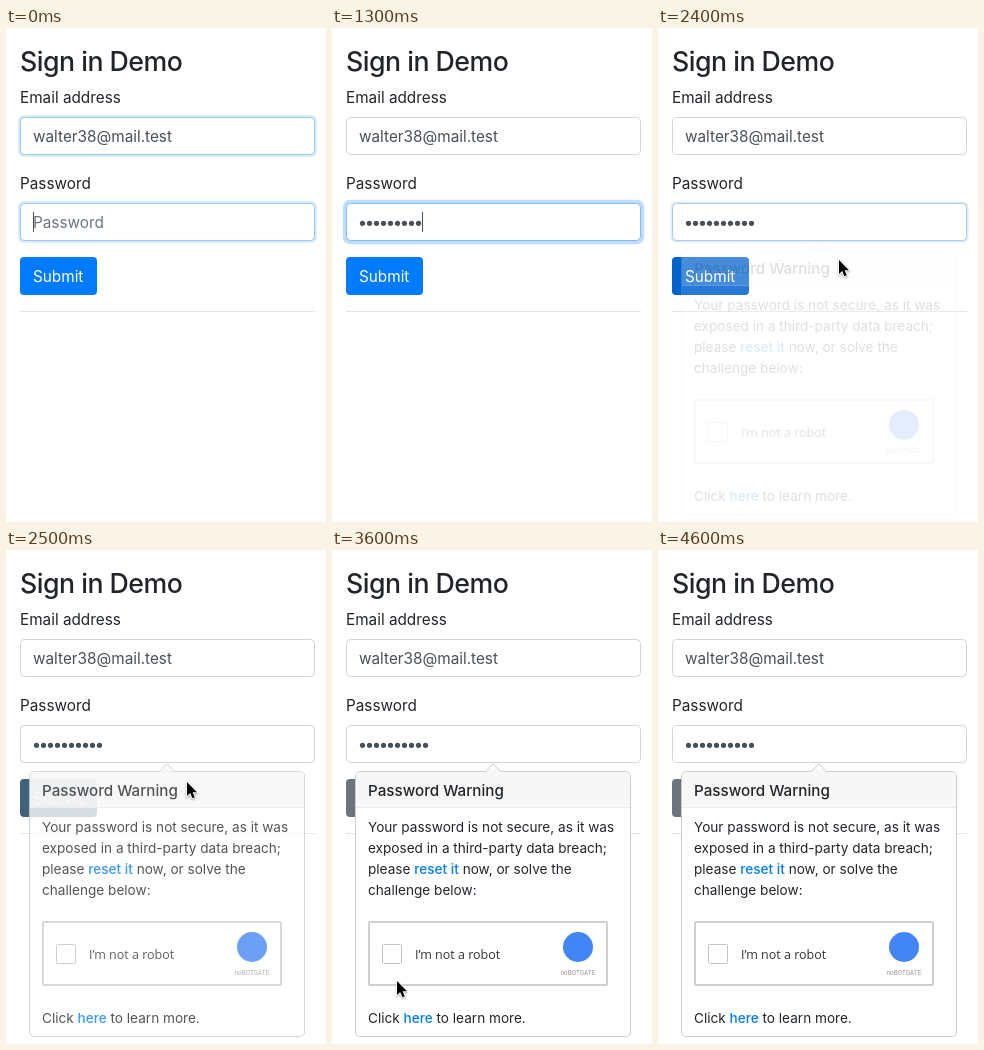
Recreate the animation shown at these times as an HTML page with a canvas. Size 320x494 px, loop 5 s.

```html
<!DOCTYPE html>
<html lang="en">
<head>
<meta charset="utf-8">
<title>Sign in Demo</title>
<style>
html, body { margin: 0; width: 100%; height: 100%; overflow: hidden; background: #fff; }
canvas { display: block; }
</style>
</head>
<body>
<canvas id="stage" width="320" height="494"></canvas>
<script>
const ctx = document.getElementById('stage').getContext('2d');
const LOOP = 5000, STEP = 100;
const SANS = 'Inter, "Liberation Sans", sans-serif';
const INK = '#212529', FIELD_INK = '#495057', BLUE = '#007bff';

// [start ms, number of typed characters]
const typing = [[0, 0], [300, 1], [400, 3], [500, 5], [700, 7], [1000, 8], [1300, 9], [1500, 10]];

// [ms, x, y] of the pointer; straight moves in between
const pointerPath = [
  [1900, 180, 151], [2200, 181, 231], [2500, 181, 232], [3000, 128, 327],
  [3400, 58, 406], [3500, 58, 406], [3600, 65, 431], [3800, 81, 457],
  [3900, 81, 457], [4100, 114, 318], [4200, 100, 357], [4300, 100, 357],
  [4400, 81, 458], [4500, 192, 440], [4600, 192, 440]
];

function typedAt(t) {
  return typing.filter(([start]) => start <= t).pop()[1];
}

function pointerAt(t) {
  const next = pointerPath.findIndex(([time]) => time > t);
  if (next < 1) return null;
  const [t0, x0, y0] = pointerPath[next - 1];
  const [t1, x1, y1] = pointerPath[next];
  const k = (t - t0) / (t1 - t0);
  return { x: Math.round(x0 + (x1 - x0) * k), y: Math.round(y0 + (y1 - y0) * k) };
}

function mix(from, to, k) {
  return `rgb(${from.map((c, i) => Math.round(c + (to[i] - c) * k)).join(',')})`;
}

function text(str, x, y, size, { color = INK, weight = 400, family = SANS, spacing = 0 } = {}) {
  ctx.font = `${weight} ${size}px ${family}`;
  ctx.letterSpacing = `${spacing}px`;
  ctx.fillStyle = color;
  ctx.fillText(str, x, y);
  return x + ctx.measureText(str).width;
}

function box(x, y, w, h, r, fill, stroke, lineWidth = 1) {
  const inset = stroke ? lineWidth / 2 : 0;
  ctx.beginPath();
  ctx.roundRect(x + inset, y + inset, w - 2 * inset, h - 2 * inset, r);
  if (fill) {
    ctx.fillStyle = fill;
    ctx.fill();
  }
  if (stroke) {
    ctx.lineWidth = lineWidth;
    ctx.strokeStyle = stroke;
    ctx.stroke();
  }
}

function field(y, focus) {
  const spread = 3.2 * focus;
  if (focus) {
    box(14 - spread, y - spread, 295 + 2 * spread, 38 + 2 * spread, 4 + spread, `rgba(0,123,255,${0.25 * focus})`);
  }
  box(14, y, 295, 38, 4, '#fff', mix([206, 212, 218], [128, 189, 255], focus));
}

function form(t) {
  text('Sign in Demo', 14, 43, 26.7, { weight: 500, spacing: -0.5 });

  text('Email address', 14, 75, 15.3);
  field(89, t < 100 ? 0.6 : 0);
  text('walter38@mail.test', 27, 114, 15.3, { color: FIELD_INK });

  text('Password', 14, 161, 15.3);
  field(175, t < 100 ? 0.6 : t < 2400 ? 1 : t < 2500 ? 0.5 : 0);
  const typed = typedAt(t);
  if (!typed) text('Password', 27, 200, 15.3, { color: '#6c757d' });
  ctx.fillStyle = FIELD_INK;
  for (let i = 0; i < typed; i++) {
    ctx.beginPath();
    ctx.arc(30.5 + 7 * i, 195.3, 2.6, 0, 2 * Math.PI);
    ctx.fill();
  }
  if (t < 1700 || (t >= 2200 && t < 2400)) ctx.fillRect(27 + 7 * typed, 184, 1, 20);

  const buttonColor = t < 2400 ? BLUE : t < 2500 ? '#0062cc' : t < 2600 ? '#41627a' : '#6c757d';
  box(14, 229, 77, 38, 4, buttonColor);
  text('Submit', 27, 254, 15.3, { color: '#fff' });
  ctx.fillStyle = 'rgba(0,0,0,.1)';
  ctx.fillRect(14, 283, 295, 1);
}

function robotCheck() {
  box(36, 371, 240, 65, 1, '#fff', '#cfcfcf', 2);
  box(50, 394, 20, 20, 1, '#fff', '#c4c4c4');
  text('I’m not a robot', 83, 409, 12.5, { color: '#333', family: '"Open Sans", sans-serif' });
  ctx.fillStyle = '#4285f4';
  ctx.beginPath();
  ctx.arc(246, 397, 15, 0, 2 * Math.PI);
  ctx.fill();
  text('noBOTGATE', 228.5, 425, 6.4, { color: '#999', family: 'Roboto, sans-serif' });
}

function popover() {
  const edge = '#cccccc', body = 13.6;
  const link = { color: BLUE, weight: 500 };
  box(23, 221, 276, 266, 4.8, '#fff', edge);
  ctx.fillStyle = '#f7f7f7';
  ctx.beginPath();
  ctx.roundRect(24, 222, 274, 36, [4, 4, 0, 0]);
  ctx.fill();
  ctx.fillStyle = '#ebebeb';
  ctx.fillRect(24, 257, 274, 1);

  ctx.beginPath();
  ctx.moveTo(153, 222);
  ctx.lineTo(161, 213.5);
  ctx.lineTo(169, 222);
  ctx.fillStyle = '#f7f7f7';
  ctx.fill();
  ctx.lineWidth = 1;
  ctx.strokeStyle = edge;
  ctx.stroke();

  text('Password Warning', 36, 246, 15.2, { weight: 500 });
  text('Your password is not secure, as it was', 36, 282, body);
  text('exposed in a third-party data breach;', 36, 303, body);
  let x = text('please ', 36, 324, body);
  x = text('reset it', x, 324, body, link);
  text(' now, or solve the', x, 324, body);
  text('challenge below:', 36, 345, body);
  robotCheck();
  x = text('Click ', 36, 473, body);
  x = text('here', x, 473, body, link);
  text(' to learn more.', x, 473, body);
}

function arrow(x, y) {
  const shape = new Path2D('M0 0V14L3.2 11L5.4 16.2L7.8 15.2L5.6 10.2H10Z');
  ctx.save();
  ctx.translate(x, y);
  ctx.shadowColor = 'rgba(0,0,0,.35)';
  ctx.shadowBlur = 2;
  ctx.shadowOffsetY = 1;
  ctx.lineWidth = 2;
  ctx.lineJoin = 'round';
  ctx.strokeStyle = '#fff';
  ctx.stroke(shape);
  ctx.shadowColor = 'transparent';
  ctx.fillStyle = '#000';
  ctx.fill(shape);
  ctx.restore();
}

function textCursor(x, y) {
  const shape = new Path2D('M-3 -7Q0 -7 .5 -5Q1 -7 4 -7M.5 -5V5M-3 7Q0 7 .5 5Q1 7 4 7M-1.5 2H2.5');
  ctx.lineWidth = 3;
  ctx.strokeStyle = 'rgba(255,255,255,.8)';
  ctx.stroke(shapeAt(shape, x, y));
  ctx.lineWidth = 1;
  ctx.strokeStyle = '#222';
  ctx.stroke(shapeAt(shape, x, y));
}

function shapeAt(shape, x, y) {
  const moved = new Path2D();
  moved.addPath(shape, new DOMMatrix().translate(x, y));
  return moved;
}

function pointer(t) {
  const at = pointerAt(t);
  if (!at) return;
  const overField = t < 2400 && at.y >= 175 && at.y < 213;
  const overText = t >= 2800 && t < 3200;
  (overField || overText ? textCursor : arrow)(at.x, at.y);
}

function draw(now) {
  const t = Math.floor((now % LOOP) / STEP) * STEP;
  ctx.fillStyle = '#fff';
  ctx.fillRect(0, 0, 320, 494);
  form(t);
  if (t >= 2400) {
    ctx.globalAlpha = t < 2500 ? 0.15 : t < 2600 ? 0.78 : 1;
    popover();
    ctx.globalAlpha = 1;
  }
  pointer(t);
}

const start = performance.now();
function tick() {
  draw(performance.now() - start);
  requestAnimationFrame(tick);
}
tick();
</script>
</body>
</html>
```
